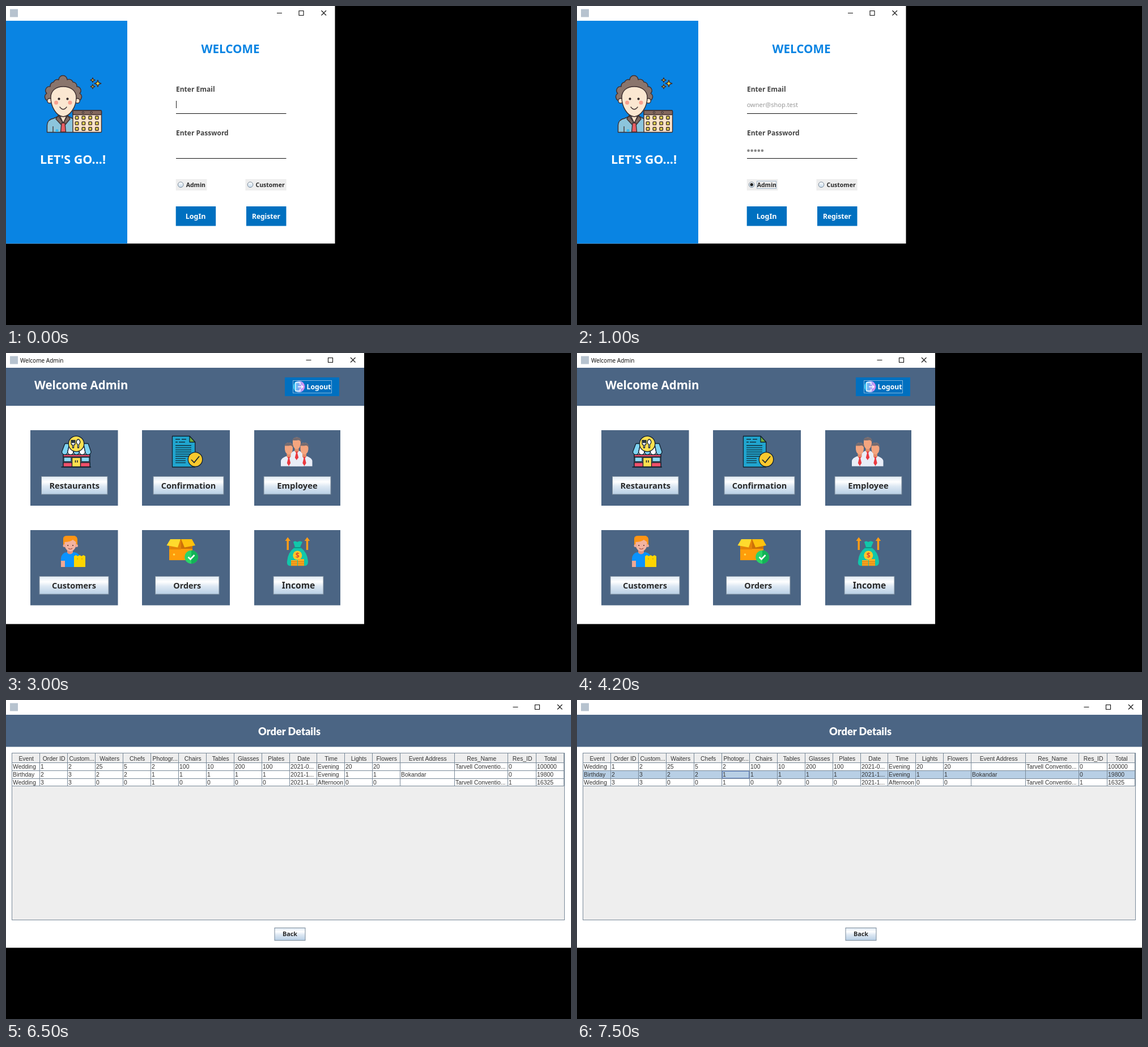
Write an HTML page that moves like this. It is 997 px wide and 562 px high and loops after 8000 ms.

```html
<!DOCTYPE html>
<html lang="en">
<head>
<meta charset="utf-8">
<title>Event manager</title>
<style>
html, body { margin: 0; width: 100%; height: 100%; overflow: hidden; background: #000; }
svg { display: block; width: 997px; height: 562px; }
text { font-family: "Noto Sans", "Open Sans", sans-serif; }
.b { font-weight: 700; }
.m { text-anchor: middle; }
.cell { font-family: "Liberation Sans", Arial, sans-serif; font-size: 10.4px; fill: #333; }
.heading { font: 900 18.2px Lato, sans-serif; fill: #fff; }
.ink { stroke: #3d2f30; stroke-width: 1.4; stroke-linejoin: round; stroke-linecap: round; }
.thin { stroke: #12212f; stroke-width: 1.3; stroke-linejoin: round; stroke-linecap: round; }
.line { fill: none; }
</style>
</head>
<body>
<svg id="stage" viewBox="0 0 997 562">
<defs>
  <linearGradient id="metal" x2="0" y2="1">
    <stop stop-color="#dde8f3"/><stop offset=".3" stop-color="#fff"/>
    <stop offset=".55" stop-color="#dde8f3"/><stop offset="1" stop-color="#b8cfe5"/>
  </linearGradient>
  <linearGradient id="exit"><stop stop-color="#25c9f5"/><stop offset="1" stop-color="#f08af0"/></linearGradient>
  <linearGradient id="radio" x2="0" y2="1"><stop stop-color="#fff"/><stop offset="1" stop-color="#c4d8ea"/></linearGradient>
</defs>
<g id="login"></g>
<g id="menu"></g>
<g id="orders"></g>
</svg>
<script>
const LOOP = 8000, SLATE = '#4b6584', BLUE = '#0070c0', GRID = '#7a8a99';
const $ = id => document.getElementById(id);
const rect = (x, y, x2, y2, fill, extra = '') =>
  `<rect x="${x}" y="${y}" width="${x2 - x}" height="${y2 - y}" fill="${fill}" ${extra}/>`;
const circle = (x, y, r, fill, extra = '') => `<circle cx="${x}" cy="${y}" r="${r}" fill="${fill}" ${extra}/>`;
const path = (d, fill, extra = '') => `<path d="${d}" fill="${fill}" ${extra}/>`;
const stroke = (d, color, width = 1) => path(d, 'none', `stroke="${color}" stroke-width="${width}"`);
const text = (x, y, size, s, fill, cls = '') =>
  `<text x="${x}" y="${y}" font-size="${size}" fill="${fill}" class="${cls}">${s}</text>`;
const range = (n, f) => Array.from({ length: n }, (_, i) => f(i)).join('');
const INK = 'class="ink"', THIN = 'class="thin"';

function frame(w, h, title = '') {
  return rect(0, 0, w, h, '#fff') + rect(7, 5.5, 21, 19.5, '#b7c3cf') +
    text(25, 16.5, 10, title, '#111') +
    stroke(`M${w - 102.5} 12.5h9 M${w - 63.5} 8.5h8v8h-8z M${w - 24} 8l8.5 8.5m0-8.5l-8.5 8.5`, '#111', 1.1);
}

function metalButton(x, y, x2, y2, size, label) {
  return rect(x + .5, y + .5, x2 - .5, y2 - .5, 'url(#metal)', `stroke="${GRID}"`) +
    text((x + x2) / 2, (y + y2) / 2 + size * .37, size, label, '#2a2a2a', 'b m');
}

const sparkle = (x, y, r) => {
  const k = r * .28;
  return path(`M${x} ${y - r}L${x + k} ${y - k}L${x + r} ${y}L${x + k} ${y + k}L${x} ${y + r}L${x - k} ${y + k}L${x - r} ${y}L${x - k} ${y - k}z`,
    '#f5df4d', INK);
};

function planner() {
  const hair = [[72, 154], [78, 142], [84, 134], [93, 130], [108, 130], [118, 134], [125, 142], [130, 154], [126, 167]];
  return path('M76 167' + hair.map(p => `A7 7 0 0 1 ${p}`).join('') + 'z', '#8a756c', INK) +
    path('M72.5 222.5V210Q73 200 84 198L93 194H109L119 199V222.5z', '#8cc5dc', INK) +
    path('M94 191L101 207L108 191z', '#f9e3cc', INK) +
    path('M92 193L88 199L99 211L101 206z M109 193L113 199L103 211L101 206z', '#806a61', INK) +
    path('M98 206h6l1.5 16h-9z', '#e75d62', INK) +
    stroke('M83 212v10', '#3d2f30', 1.3) +
    circle(77, 167, 4.2, '#f9e3cc', INK) + circle(126, 167, 4.2, '#f9e3cc', INK) +
    path('M79 161C79 149 88 142 101 142S124 149 124 161C124 178 113 194 101 195C89 194 79 178 79 161z', '#fbe7d1', INK) +
    circle(93.5, 163.7, 2.1, '#33282a') + circle(108.5, 163.7, 2.1, '#33282a') +
    circle(88.5, 170.3, 3.5, '#f8a18f') + circle(113, 170.3, 3.5, '#f8a18f') +
    path('M95 178Q101 186 107 178', 'none', INK) +
    rect(118, 184, 168.5, 222.5, '#fbe3c9', INK + ' rx="1.5"') +
    rect(118, 184, 168.5, 191.5, '#84685e', INK + ' rx="1.5"') +
    circle(136, 187.5, 1.4, '#fbe3c9', INK) + circle(150.5, 187.5, 1.4, '#fbe3c9', INK) +
    range(12, i => {
      const x = 122.3 + i % 4 * 11.8, y = 194 + (i >> 2) * 9.9;
      return rect(x, y, x + 5.5, y + 5.5, '#e2cf4a', INK + ' rx="1.2"');
    }) +
    circle(90, 219.5, 2.5, '#35b8f2') +
    sparkle(162, 136.5, 5.8) + sparkle(153, 130.5, 4) + sparkle(153, 142, 3.7);
}

const radio = (x, x2, label) => rect(x, 305, x2, 325, '#eee') +
  circle(x + 8.5, 314.8, 4.8, 'url(#radio)', `stroke="${GRID}"`) +
  text(x + 18, 318.8, 10.5, label, '#2a2a2a', 'b');
const flatButton = (x, size, label) => rect(x, 353, x + 70.5, 387.5, BLUE) +
  text(x + 35, 375.4, size, label, '#fff', 'b m');

$('login').innerHTML = frame(580.5, 418.5) +
  rect(0, 26, 214, 418.5, '#0984e3') + planner() +
  text(118, 277.5, 21.5, "LET'S GO...!", '#fff', 'b m') +
  text(396, 82.5, 20.7, 'WELCOME', '#0984e3', 'b m') +
  text(300, 151, 12, 'Enter Email', '#444', 'b') +
  text(300, 228, 12, 'Enter Password', '#444', 'b') +
  stroke('M300 189.5H494.5 M300 268.5H494.5', '#111') +
  radio(299.7, 354.5, 'Admin') + radio(422.5, 494.7, 'Customer') +
  flatButton(299.7, 12.5, 'LogIn') + flatButton(424, 12, 'Register') +
  `<g id="empty">${stroke('M300.5 167V180', '#222')}</g>` +
  '<g id="filled">' + text(299.7, 178, 11, 'owner@shop.test', '#999') +
  range(5, i => circle(302.5 + i * 6.1, 254.8, 2.3, '#888')) +
  circle(308.2, 314.8, 2.7, '#222') +
  rect(317.5, 308.5, 351.5, 321.5, 'none', 'stroke="#a3b8cc"') + '</g>';

const shop = () =>
  rect(101, 174, 148, 200.5, '#f7f9fc', THIN) + rect(101, 179, 148, 183, '#f2506a', THIN) +
  rect(102, 183.5, 115, 191.5, '#8fdcf7', THIN) + rect(133, 183.5, 147, 191.5, '#8fdcf7', THIN) +
  rect(101, 193, 148, 200.5, '#f2506a', THIN) + rect(116.5, 184, 131.5, 200.5, '#ffe04f', THIN) +
  stroke('M122.5 189v4m3.5-4v4', '#12212f', 1.5) +
  range(5, i => {
    const top = 104 + i * 8.2, low = 98.5 + i * 10.3;
    return path(`M${top} 159.5h8.2L${low + 10.3} 174a5.1 5.1 0 0 1-10.3 0z`, i % 2 ? '#fff' : '#7fd3f2', THIN);
  }) +
  circle(124, 160, 13.7, '#ffe04f', THIN) +
  path('M115 154v5q0 3 2.5 3v5h2v-5q2.5 0 2.5-3v-5h-1.6v4h-1.2v-4h-1.6v4h-1v-4z', '#fff', THIN) +
  path('M126.5 167v-6q-3-2-2-6q1.5-3 3-3t3 3q1 4-2 6v6z', '#fff', THIN) +
  stroke('M97.5 200.8h52.5', '#12212f', 1.8);

const document_ = () =>
  path('M293.5 146.5H324L333.7 157V201H293.5z', '#20a5cf', THIN) + path('M324 146.5V157H333.7z', '#6fae3c', THIN) +
  stroke('M299 152h8m3 0h8 M299 157h4m2 0h11' + range(9, i => `M299 ${163 + i * 3.8}h${i < 6 ? 28 : 18}`), '#12303f', 1.3) +
  circle(334, 187.5, 12.7, '#f9c92e', THIN) + stroke('M327 188l5 5 9-11', '#12212f', 1.7);

function worker(x, y, w) {
  return path(`M${x - w} 199.5V${y + 22}Q${x - w + 1} ${y + 17} ${x - 5} ${y + 14}H${x + 5}Q${x + w - 1} ${y + 17} ${x + w} ${y + 22}V199.5z`, '#e9edf7') +
    path(`M${x - 3.5} ${y + 7}v8l3.5 3 3.5-3v-8z`, '#e58d69') +
    path(`M${x - 7} ${y - 3}q0-7 7-7t7 7v5q-1 8-7 9q-6-1-7-9z`, '#f4a57f') +
    path(`M${x - 7.5} ${y}q-1.5-10 7.5-10t7.5 10q-1-5-5-5q-6 1-10 0z`, '#766b6f') +
    path(`M${x - 2} ${y + 15}h4l-.8 3 2 8-3.2 5-3.2-5 2-8z`, '#eb3940');
}

const customer = () =>
  path('M97 377V362Q98 352 107 351H121Q129 353 130 359V377z', '#0a93ff') +
  path('M97 366h7v11h-7z', '#efa894') + path('M108 344h10v8q-5 5-10 0z', '#df927f') +
  path('M101 338V327Q101 322 108 322H121Q127 324 126 331V339z', '#ff9414') +
  path('M103.5 333Q113 333 118 329L123.5 333V340Q121 349 113.5 349.5Q106 349 103.5 340z', '#f3b3a0') +
  circle(103, 339.5, 2.5, '#efa894') + circle(124.5, 339.5, 2.5, '#efa894') +
  circle(109.2, 339, 1.1, '#553636') + circle(118, 339, 1.1, '#553636') +
  stroke('M110 344q3.5 3 7 0', '#a84f48', 1.2) +
  path('M120 358l3.3-2 3.3 2 3.4-2 3.3 2 3.3-2 3.4 2V377H120z', '#ffd500') + stroke('M126 361v3m8-3v3', '#e6a700', 1.2);

const parcel = () =>
  path('M288 337H329V365H288z', '#ff9d0a') + path('M290 328H328L329 345H289z', '#cc7108') +
  path('M290 328L309 331V346H288z', '#e48408') + path('M290 328H308L303 342.5L283.5 339z', '#ffda2d') +
  path('M328 328H309L315 342.5L334 339z', '#ffc20e') + circle(296.5, 355, 1.8, '#ffe04f') +
  circle(327, 359.5, 11.8, '#2bd568') + path('M327 347.7a11.8 11.8 0 0 1 0 23.6z', '#12b257') +
  stroke('M321.5 359.5l4 4 7-7.5', '#fff', 2.6);

const money = () =>
  path('M507 333q3-3 7 0q4-3 9 0l-4 9q13 9 14 25q0 8-6 8H502q-7 0-6-8q1-16 14-25z', '#12c6aa') +
  stroke('M508 343h13', '#0b9a87', 2) + circle(514.3, 356.5, 8, '#ffc928') +
  text(514.3, 361, 12.5, '$', '#e14b2d', 'b m') +
  range(2, i => rect(503 + i * 12, 365 - i * 2, 514 + i * 12, 375, '#ffad1f') +
    range(3, j => stroke(`M${503 + i * 12} ${367.5 + j * 3}h11`, '#d47712', 1))) +
  range(2, i => path(`M${492.5 + i * 34.3} 331l4.7-6.5 4.7 6.5h-3v16h-3.4v-16z`, '#ff9d16'));

$('menu').innerHTML = frame(632, 477.5, 'Welcome Admin') +
  rect(0, 26, 632, 93, SLATE) + text(50, 64.3, 20.5, 'Welcome Admin', '#fff', 'b') +
  rect(492, 43, 588, 76, BLUE) + rect(506.5, 48.5, 574.5, 70.5, 'none', 'stroke="#83b5de"') +
  circle(517, 59.3, 10.3, 'url(#exit)') +
  stroke('M519 56v-4h-8v15h8v-4 M515 59.5h9m-3-3l3 3-3 3', '#fff', 1.3) +
  text(530.5, 64.3, 12.2, 'Logout', '#fff', 'b') +
  [[43, 197.5], [240, 395], [438, 590]].map(([a, b]) =>
    rect(a, 136, b, 269, SLATE) + rect(a, 312, b, 444.5, SLATE)).join('') +
  shop() + document_() + worker(513, 158.5, 12) + worker(499, 168, 14) + worker(526.5, 168, 14) +
  customer() + parcel() + money() +
  [[62, 217, 179.5, 14.6, 'Restaurants'], [259.5, 217, 384.5, 14.5, 'Confirmation'], [454.5, 217, 573.5, 14.8, 'Employee'],
   [58.5, 393, 181.5, 14.5, 'Customers'], [263, 393, 376.5, 14.4, 'Orders'], [471.5, 393, 560.5, 15.6, 'Income']]
    .map(([x, y, x2, size, label]) => metalButton(x, y, x2, y + 32.5, size, label)).join('');

const heads = 'Event,Order ID,Custom...,Waiters,Chefs,Photogr...,Chairs,Tables,Glasses,Plates,Date,Time,Lights,Flowers,Event Address,Res_Name,Res_ID,Total'.split(',');
const rows = [
  'Wedding,1,2,25,5,2,100,10,200,100,2021-0...,Evening,20,20,,Tarvell Conventio...,0,100000',
  'Birthday,2,3,2,2,1,1,1,1,1,2021-1...,Evening,1,1,Bokandar,,0,19800',
  'Wedding,3,3,0,0,1,0,0,0,0,2021-1...,Afternoon,0,0,,Tarvell Conventio...,1,16325'
].map(r => r.split(','));
const edge = i => i < 15 ? 10.5 + Math.round(i * 48.95) : [791.5, 885.5, 935.5, 984.5][i - 15];
const rowY = [110.5, 124.5, 138.5, 151.5];
const cell = (x, y, s, cls = '') => `<text class="cell ${cls}" x="${x}" y="${y}">${s}</text>`;

$('orders').innerHTML = frame(997, 436.5) +
  rect(0, 26, 997, 82.5, SLATE) + '<text class="heading m" x="500" y="61.5">Order Details</text>' +
  rect(10.5, 93.5, 985.5, 387.5, '#eee', `stroke="${GRID}"`) +
  rect(11, 111, 984.5, 151.5, '#fff') +
  '<g id="picked">' + rect(11, 125, 984.5, 138, '#b8cfe5') + '</g>' +
  stroke(rowY.map(y => `M11 ${y}H984.5`).join('') + range(18, i => `M${edge(i + 1)} 94V151.5`), GRID) +
  `<g id="focus">${rect(256.5, 125.5, 303.5, 137.5, 'none', 'stroke="#6382bf"')}</g>` +
  heads.map((s, i) => cell((edge(i) + edge(i + 1)) / 2 + .7, 106.7, s, 'm')).join('') +
  rows.map((r, j) => r.map((s, i) => cell(edge(i) + 1.6, 121.3 + j * 13.8, s)).join('')).join('') +
  metalButton(473.5, 401, 528.5, 424, 10.8, 'Back');

const show = (id, on) => $(id).style.display = on ? '' : 'none';

function draw() {
  const t = performance.now() % LOOP;
  show('login', t < 3000);
  show('empty', t < 1000);
  show('filled', t >= 1000);
  show('menu', t >= 3000 && t < 5000);
  show('orders', t >= 5000);
  show('picked', t >= 7500);
  show('focus', t >= 7500);
  requestAnimationFrame(draw);
}
draw();
</script>
</body>
</html>
```
